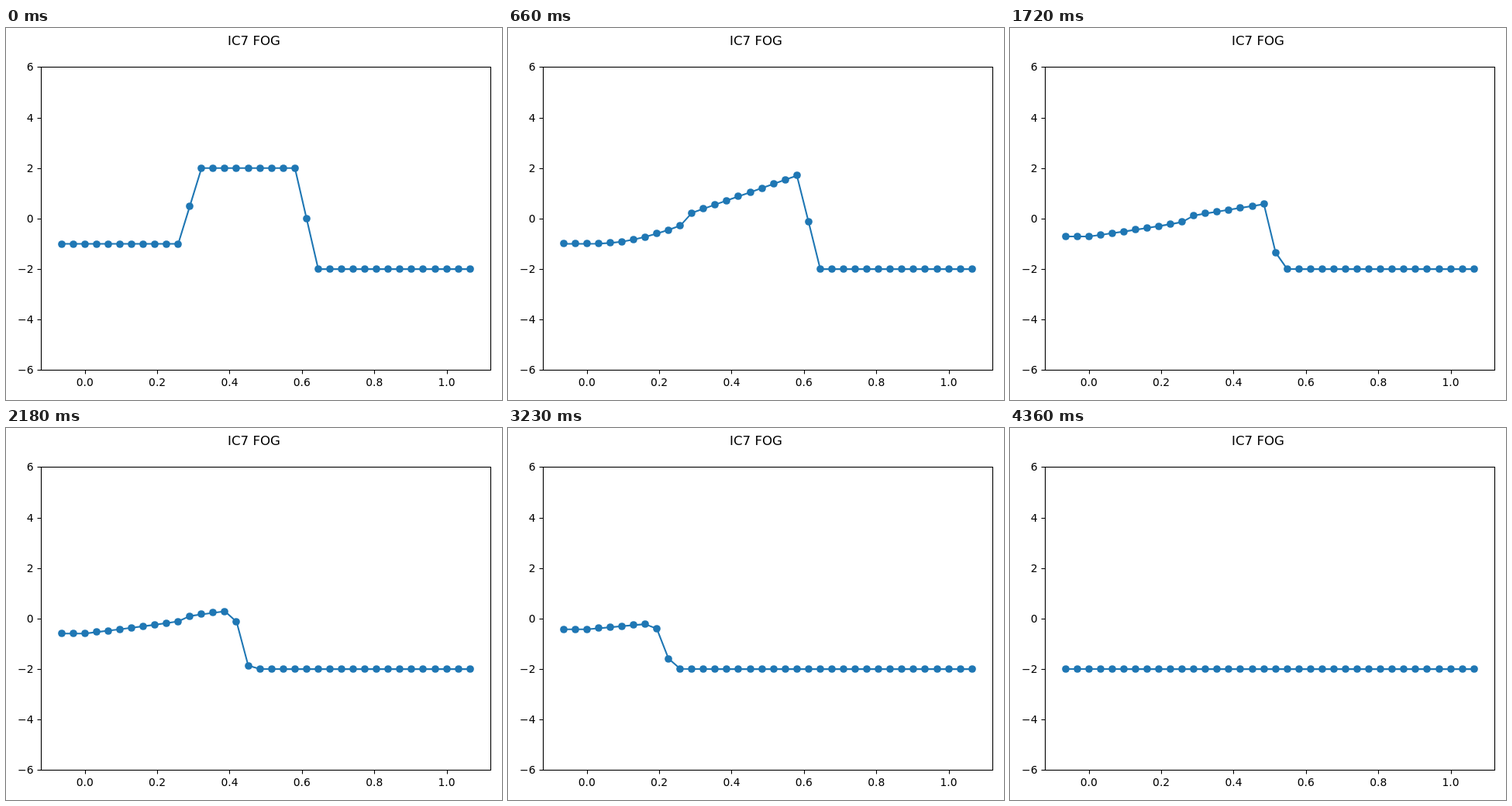
Write an HTML page with a canvas that moves like this. It is 640x480 px and loops after 7 s.

```html
<!DOCTYPE html>
<html lang="en">
<head>
<meta charset="utf-8">
<title>IC7 FOG</title>
<style>
  html, body { margin: 0; width: 100%; height: 100%; overflow: hidden; background: #fff; }
  canvas { display: block; }
</style>
</head>
<body>
<canvas id="plot" width="640" height="480"></canvas>
<script>
const ctx = document.getElementById("plot").getContext("2d");
const PT = 100 / 72;
const LOOP = 7000, STEPS = 105;
const CELLS = 36, GHOSTS = 2, DX = 1 / 31, RATIO = 0.45; // RATIO = dt / dx
const BOX = { left: 45.24, right: 625.04, top: 50.45, bottom: 441.4 };
const COLOR = "#1f77b4", FONT = '"DejaVu Sans", sans-serif';

const firstX = -GHOSTS * DX;
const pad = (CELLS - 1) * DX / 20;
const xScale = (BOX.right - BOX.left) / ((CELLS - 1) * DX + 2 * pad);
const toX = x => BOX.left + (x - firstX + pad) * xScale;
const toY = u => BOX.top + (6 - u) * (BOX.bottom - BOX.top) / 12;
const crisp = v => Math.round(v) + 0.5;

// Burgers' equation, first order Godunov scheme with outflow boundaries
const flux = (a, b) => Math.max(Math.max(a, 0) ** 2, Math.min(b, 0) ** 2) / 2;

function advance(u) {
  const last = CELLS - GHOSTS - 1;
  const next = u.map((v, i) => i < GHOSTS || i > last
    ? v : v - RATIO * (flux(v, u[i + 1]) - flux(u[i - 1], v)));
  return next.map((v, i) => next[Math.min(last, Math.max(GHOSTS, i))]);
}

function initial(i) {
  if (i === 11) return 0.5;
  if (i === 21) return 0;
  return i < 11 ? -1 : i < 21 ? 2 : -2;
}

const states = [Array.from({ length: CELLS }, (_, i) => initial(i))];
while (states.length <= STEPS) states.push(advance(states[states.length - 1]));
const starts = states.map((_, k) => Math.round(k * 6.6) * 10);

function segment(x1, y1, x2, y2) {
  ctx.beginPath();
  ctx.moveTo(x1, y1);
  ctx.lineTo(x2, y2);
  ctx.stroke();
}

function label(text, x, y, size, align) {
  ctx.font = `${size * PT}px ${FONT}`;
  ctx.textAlign = align;
  ctx.fillText(text, x, y);
}

function drawAxes() {
  const left = crisp(BOX.left), right = crisp(BOX.right);
  const top = crisp(BOX.top), bottom = crisp(BOX.bottom);
  ctx.fillStyle = ctx.strokeStyle = "#000";
  ctx.lineWidth = 0.8 * PT;
  ctx.lineJoin = "miter";
  ctx.lineCap = "butt";
  ctx.strokeRect(left, top, right - left, bottom - top);
  for (let n = 0; n <= 5; n++) {
    const x = crisp(toX(n / 5));
    segment(x, bottom, x, bottom + 5);
    label((n / 5).toFixed(1), toX(n / 5), 462, 10, "center");
  }
  for (let u = -6; u <= 6; u += 2) {
    const y = crisp(toY(u));
    segment(left, y, left - 5, y);
    label(String(u).replace("-", "\u2212"), BOX.left - 7 * PT, Math.round(toY(u)) + 5, 10, "right");
  }
  label("IC7 FOG", 320, 22, 12, "center");
}

function drawCurve(u) {
  const points = u.map((v, i) => [toX(firstX + i * DX), toY(v)]);
  const flat = Math.max(...u) - Math.min(...u) < 1e-5;
  ctx.fillStyle = ctx.strokeStyle = COLOR;
  ctx.lineWidth = 1.5 * PT;
  ctx.lineJoin = "round";
  ctx.lineCap = "square";
  ctx.beginPath();
  for (const [x, y] of points) ctx.lineTo(x, flat ? Math.round(y) : y);
  ctx.stroke();
  // markers sit on whole pixels
  for (const [x, y] of points) {
    ctx.beginPath();
    ctx.arc(Math.round(x), Math.round(y), 3.5 * PT, 0, 2 * Math.PI);
    ctx.fill();
  }
}

function draw(time) {
  let step = STEPS;
  while (starts[step] > time) step--;
  ctx.fillStyle = "#fff";
  ctx.fillRect(0, 0, 640, 480);
  drawCurve(states[step]);
  drawAxes();
}

const origin = performance.now();
function tick() {
  draw((performance.now() - origin) % LOOP);
  requestAnimationFrame(tick);
}
tick();
</script>
</body>
</html>
```
